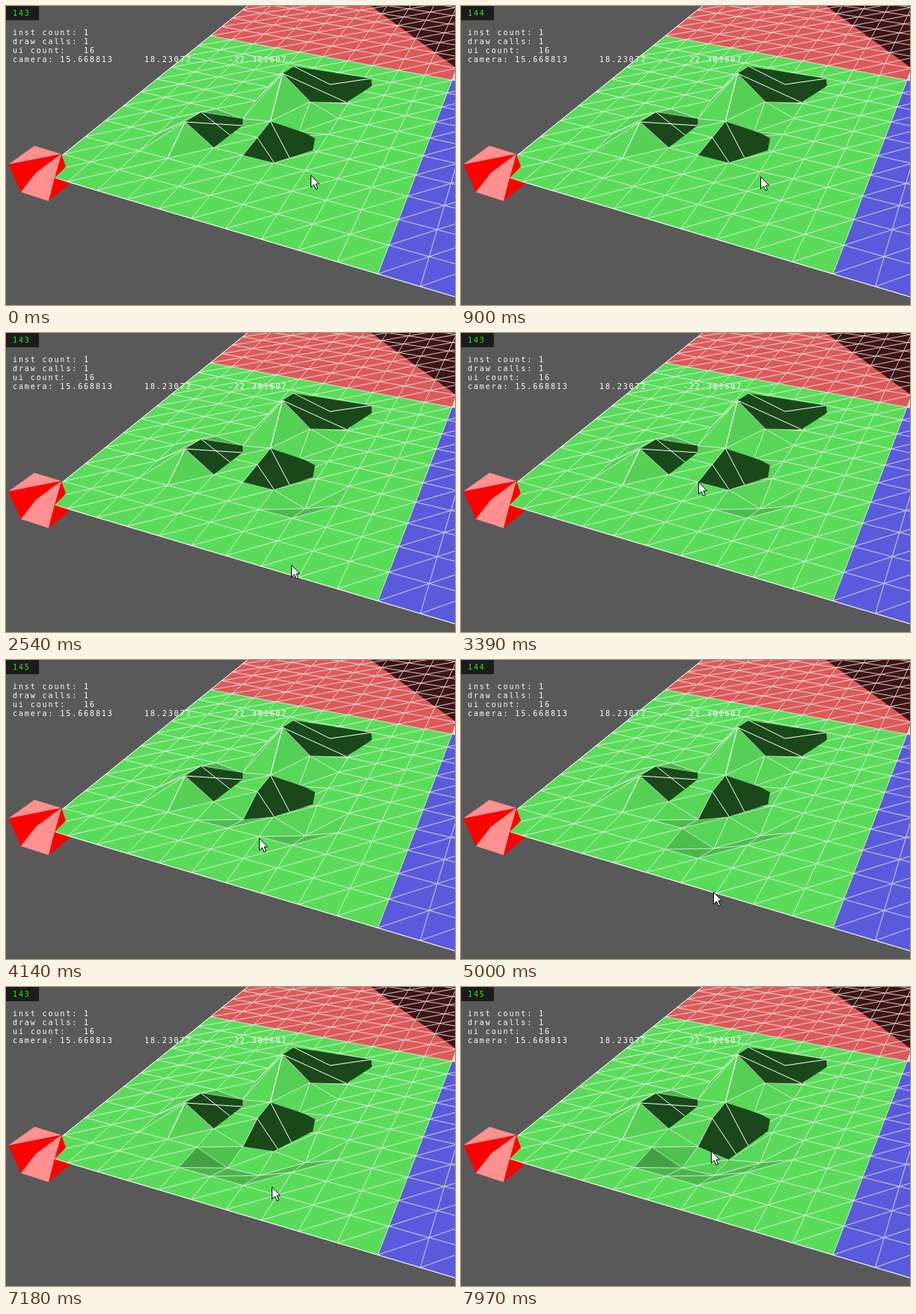
Animation, 600 px wide and 400 px high, one loop 8 s. Source, as an HTML page with a canvas:

```html
<!DOCTYPE html>
<html lang="en">
<head>
<meta charset="utf-8">
<title>Terrain editor</title>
<style>
html, body { margin: 0; width: 100%; height: 100%; overflow: hidden; background: #595959; }
canvas { display: block; width: 600px; height: 400px; }
</style>
</head>
<body>
<canvas id="stage" width="600" height="400"></canvas>
<script>
const ctx = document.getElementById('stage').getContext('2d');
const LOOP = 8000, SIZE = 10;
const GREEN = [90, 220, 90], RED = [220, 90, 90], BLUE = [90, 90, 220], MAROON = [62, 20, 20];
const WIRE = 'rgba(255,255,255,.62)';
const PULL = .175;     // terrain drop per pixel of mouse drag
const RETURN = 380;    // time the mouse takes to reach the next vertex

// Raised and sunken vertices, in screen pixels
const relief = {
  '3,3': 25, '3,4': 16, '4,5': -5, '5,6': 44, '5,7': 35, '6,6': 14, '6,5': -6, '6,4': 10
};
// Each drag grabs a vertex and pulls it down
const drags = [
  { s: 7, t: 3, from: 870, to: 1220, dx: 2, dy: 85 },
  { s: 6, t: 4, from: 1900, to: 2560, dx: 6, dy: 128 },
  { s: 5, t: 3, from: 3480, to: 3800, dx: 10, dy: 80 },
  { s: 6, t: 2, from: 4400, to: 4900, dx: 7, dy: 91 },
  { s: 5, t: 2, from: 5600, to: 6140, dx: 39, dy: 98 },
  { s: 6, t: 3, from: 6900, to: 7500, dx: -6, dy: 122 }
];
const clamp = (x, lo = 0, hi = 1) => Math.max(lo, Math.min(hi, x));
const smooth = k => k * k * (3 - 2 * k);
const mix = (a, b, k) => a.map((v, i) => v + (b[i] - v) * k);
const progress = (d, time) => clamp((time - d.from) / (d.to - d.from));

let heights = {};
const height = (s, t) => heights[s + ',' + t] || 0;

// Perspective projection of the flat grid
function project(s, t) {
  const u = s / SIZE, v = t / SIZE, w = 1 - .1856 * u + .4563 * v;
  return [(45 + 359.7 * u + 352.6 * v) / w, (224 + 67.9 * u - 165.75 * v) / w];
}

function vertex(s, t) {
  const [x, y] = project(s, t);
  return [x, y - height(s, t)];
}

function trace(points, close = true) {
  ctx.beginPath();
  points.forEach(([x, y]) => ctx.lineTo(x, y));
  if (close) ctx.closePath();
}

function poly(points, fill, stroke) {
  trace(points);
  ctx.fillStyle = fill;
  ctx.fill();
  if (stroke) {
    ctx.strokeStyle = stroke;
    ctx.stroke();
  }
}

function line(points, color = '#fff', width = 1) {
  trace(points, false);
  ctx.strokeStyle = color;
  ctx.lineWidth = width;
  ctx.stroke();
}

function clipped(points, paint) {
  ctx.save();
  trace(points);
  ctx.clip();
  paint();
  ctx.restore();
}

// Light comes from the left and the front
function tint(rgb, ds, dt) {
  const away = Math.max(0, -ds - 14.5) * .1;
  const f = 1 - away + dt * (dt > 0 ? .045 : .01);
  return `rgb(${rgb.map(c => Math.round(c * clamp(f, .3, 1 - Math.abs(ds) * .002)))})`;
}

// Cells from back to front, two triangles each
function chunk(s0, t0, cols, rows, rgb) {
  ctx.lineWidth = .9;
  for (let t = t0 + rows - 1; t >= t0; t--) {
    for (let s = s0; s < s0 + cols; s++) {
      const a = vertex(s, t), b = vertex(s + 1, t);
      const c = vertex(s + 1, t + 1), d = vertex(s, t + 1);
      const ha = height(s, t), hb = height(s + 1, t);
      const hc = height(s + 1, t + 1), hd = height(s, t + 1);
      poly([a, c, d], tint(rgb, hc - hd, hd - ha), WIRE);
      poly([a, b, c], tint(rgb, hb - ha, hc - hb), WIRE);
    }
  }
}

// Slope in shadow with the wires that cross it
function shadow(points, ...wires) {
  poly(points, 'rgb(26,72,26)');
  clipped(points, () => wires.forEach(w => line(w)));
}

function shadows() {
  const low = [316, 160], mid = [433, 105], end = [488, 97], rim = [455, 129];
  const [a, b, c] = [vertex(3, 3), vertex(3, 4), vertex(4, 3)];
  shadow([a, b, vertex(4, 5), low, c], [a, low], [b, [301, 174]], [a, c]);

  const [d, e, f] = [vertex(5, 6), vertex(5, 7), vertex(6, 6)];
  shadow([d, e, end, [489, 107], rim, f], [e, mid, end], [d, rim], [d, f]);

  const [g, h, i] = [vertex(5, 3), vertex(5, 4), vertex(5, 5)];
  shadow([i, [400, 170], [413, 177], [410, 193], vertex(6, 3), g, h],
         [h, [376, 236]], [i, [392, 228]], [g, h, i]);

  line([d, vertex(5, 5)]);
  line([a, vertex(3, 2)]);
}

function marker() {
  const pink = '#ff9090', red = '#f00';
  const left = [3, 212], top = [38, 187], peak = [74, 198], core = [40, 223];
  const base = [20, 249], foot = [57, 261], cut = [65, 230];
  poly([left, top, peak], pink);
  poly([left, peak, core, base], red);
  poly([base, core, peak, cut, foot], pink);
  poly([peak, [80, 215], cut], red);
  poly([cut, [86, 237], foot], red);
}

function hud(time) {
  const rate = 143 + Number('0102102'[Math.floor((time + 700) / 1400)]);
  ctx.fillStyle = '#1c1c1c';
  ctx.fillRect(0, 0, 44, 19);
  ctx.font = '10px "DejaVu Sans Mono", monospace';
  ctx.letterSpacing = '1.9px';
  ctx.fillStyle = '#30e830';
  ctx.fillText(rate, 9, 13);
  ctx.fillStyle = '#fff';
  ['inst count: 1', 'draw calls: 1', 'ui count:   16', 'camera: 15.668813']
    .forEach((text, i) => ctx.fillText(text, 9, 39 + i * 12));
  ctx.fillText('18.23072', 185, 75);
  ctx.fillText('-22.301607', 297, 75);
}

// The mouse follows the drags and glides from one vertex to the next
function mouseAt(time) {
  const n = drags.filter(d => d.from <= time).length;
  const next = n < drags.length ? project(drags[n].s, drags[n].t) : [334, 219];
  if (!n) return mix([407, 226], next, smooth(time / drags[0].from));
  const d = drags[n - 1], k = progress(d, time), [x, y] = project(d.s, d.t);
  return mix([x + d.dx * k, y + d.dy * k], next, smooth(clamp((time - d.to) / RETURN)));
}

function pointer(time) {
  const [x, y] = mouseAt(time).map(v => Math.round(v) + .5);
  ctx.lineWidth = 1;
  poly([[0, 0], [0, 16], [4, 12.5], [6.5, 18.5], [9, 17.5], [6.5, 11.5], [11, 11.5]]
    .map(p => [x + p[0], y + p[1]]), '#fff', '#000');
}

function draw(time) {
  heights = { ...relief };
  for (const d of drags) {
    heights[d.s + ',' + d.t] = height(d.s, d.t) - PULL * d.dy * progress(d, time);
  }
  ctx.fillStyle = '#595959';
  ctx.fillRect(0, 0, 600, 400);

  chunk(10, 10, 1, 1, [225, 205, 205]);
  chunk(0, 10, 10, 10, RED);
  clipped([vertex(10, 11), vertex(5, 16), [610, -5]], () => chunk(0, 10, 10, 10, MAROON));
  chunk(10, 0, 4, 10, BLUE);
  chunk(0, 0, 10, 10, GREEN);
  shadows();
  line([vertex(0, 0), vertex(13, 0)]);
  line([vertex(0, 0), vertex(0, 20)]);
  marker();
  hud(time);
  pointer(time);
}

function tick() {
  draw(performance.now() % LOOP);
  requestAnimationFrame(tick);
}
tick();
</script>
</body>
</html>
```
